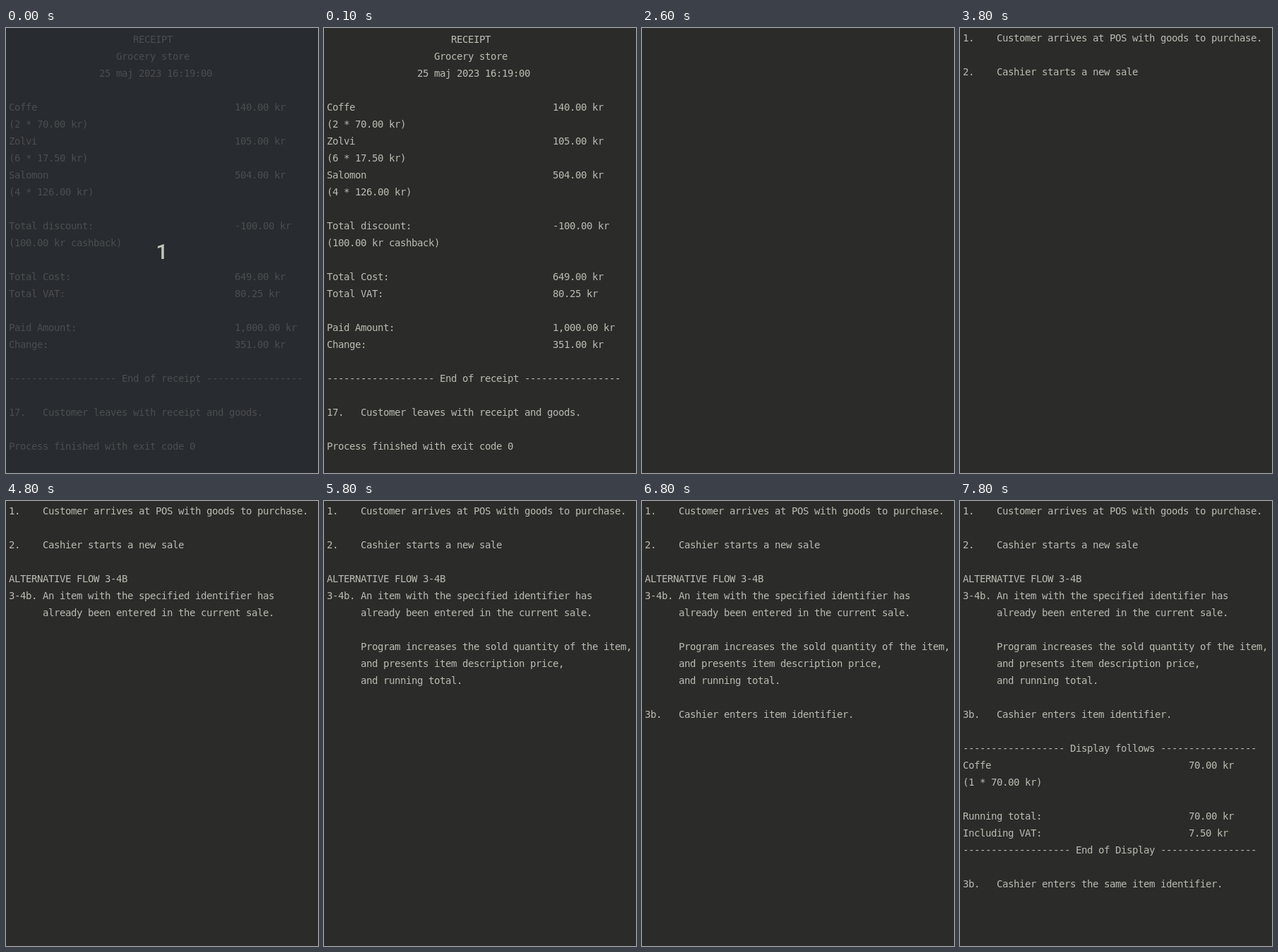
An HTML page that plays this animation: 442x630 px, repeating every 8000 ms.

```html
<!DOCTYPE html>
<html lang="en">
<head>
<meta charset="utf-8">
<title>Point of sale console</title>
<style>
  html, body { margin: 0; width: 100%; height: 100%; overflow: hidden; background: #2b2b29; }
  svg { display: block; width: 442px; height: 630px; }
  /* The tracking gives an 8px character grid. */
  text { white-space: pre; font: 14px "DejaVu Sans Mono", monospace; letter-spacing: -0.428px; fill: #bbbbb3; }
  .dim text { fill: #4b4e50; }
  #count { font: 500 30px Roboto, sans-serif; letter-spacing: 0; fill: #bfc7b6; text-anchor: middle; }
</style>
</head>
<body>
<svg id="stage" viewBox="0 0 442 630">
  <rect id="shade" width="442" height="630" fill="#282b2f"/>
  <g id="receipt"></g>
  <g id="log"></g>
  <text id="count" x="221" y="326.5">1</text>
</svg>
<script>
const LOOP = 8000, LEFT = 4, LINE_HEIGHT = 24;
const COUNTDOWN_END = 100, RECEIPT_END = 2600;

const $ = id => document.getElementById(id);
const at = (column, text) => " ".repeat(column) + text;
const row = (label, value) => label.padEnd(40) + value;
const rule = (dashes, title) => `${"-".repeat(dashes)} ${title} ${"-".repeat(17)}`;
const step = (label, text) => label.padEnd(6) + text;

const receiptLines = [
  at(22, "RECEIPT"),
  at(19, "Grocery store"),
  at(16, "25 maj 2023 16:19:00"),
  "",
  row("Coffe", "140.00 kr"),
  "(2 * 70.00 kr)",
  row("Zolvi", "105.00 kr"),
  "(6 * 17.50 kr)",
  row("Salomon", "504.00 kr"),
  "(4 * 126.00 kr)",
  "",
  row("Total discount:", "-100.00 kr"),
  "(100.00 kr cashback)",
  "",
  row("Total Cost:", "649.00 kr"),
  row("Total VAT:", "80.25 kr"),
  "",
  row("Paid Amount:", "1,000.00 kr"),
  row("Change:", "351.00 kr"),
  "",
  rule(19, "End of receipt"),
  "",
  step("17.", "Customer leaves with receipt and goods."),
  "",
  "Process finished with exit code 0"
];

// Each block is printed at its time and followed by an empty line.
const blocks = [
  [2700, [step("1.", "Customer arrives at POS with goods to purchase.")]],
  [3800, [step("2.", "Cashier starts a new sale")]],
  [4800, [
    "ALTERNATIVE FLOW 3-4B",
    step("3-4b.", "An item with the specified identifier has"),
    at(6, "already been entered in the current sale.")
  ]],
  [5800, [
    at(6, "Program increases the sold quantity of the item,"),
    at(6, "and presents item description price,"),
    at(6, "and running total.")
  ]],
  [6800, [step("3b.", "Cashier enters item identifier.")]],
  [7800, [
    rule(18, "Display follows"),
    row("Coffe", "70.00 kr"),
    "(1 * 70.00 kr)",
    "",
    row("Running total:", "70.00 kr"),
    row("Including VAT:", "7.50 kr"),
    rule(19, "End of Display"),
    "",
    step("3b.", "Cashier enters the same item identifier.")
  ]]
];

function print(parent, lines, baseline) {
  const group = document.createElementNS(parent.namespaceURI, "g");
  lines.forEach((line, i) => {
    const text = document.createElementNS(parent.namespaceURI, "text");
    text.setAttribute("x", LEFT);
    text.setAttribute("y", baseline + i * LINE_HEIGHT);
    text.textContent = line;
    group.append(text);
  });
  parent.append(group);
  return group;
}

print($("receipt"), receiptLines, 21);

let baseline = 19;
const log = blocks.map(([time, lines]) => {
  const group = print($("log"), lines, baseline);
  baseline += (lines.length + 1) * LINE_HEIGHT;
  return { time, group };
});

const show = (element, visible) => { element.style.display = visible ? "" : "none"; };

function draw(t) {
  const counting = t < COUNTDOWN_END;
  show($("shade"), counting);
  show($("count"), counting);
  show($("receipt"), t < RECEIPT_END);
  $("receipt").classList.toggle("dim", counting);
  log.forEach(({ time, group }) => show(group, t >= time));
}

const start = performance.now();
function tick() {
  draw((performance.now() - start) % LOOP);
  requestAnimationFrame(tick);
}
tick();
</script>
</body>
</html>
```
